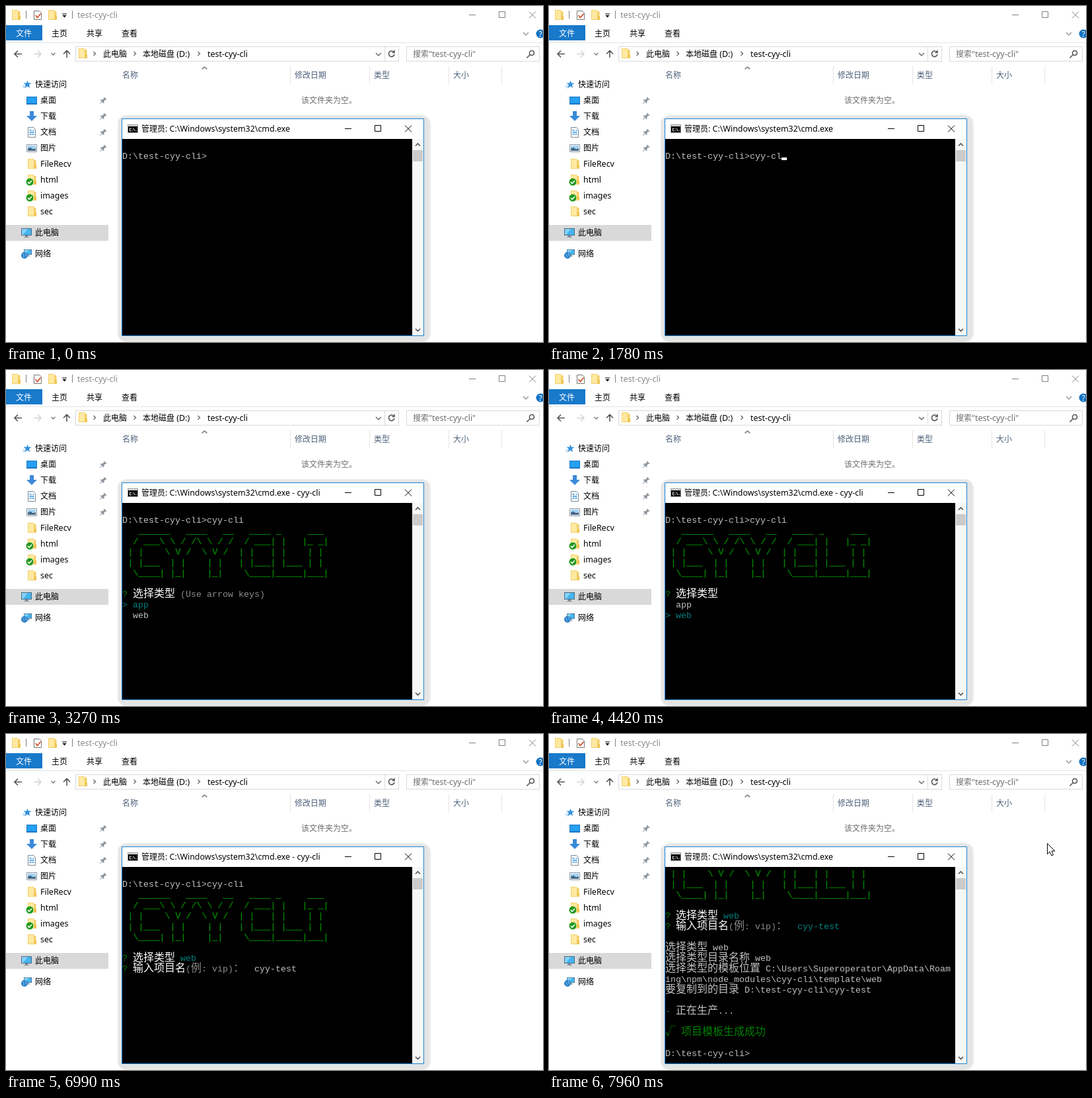
Recreate the animation shown at these times as an HTML page. Size 813 px wide and 508 px high, loop 8 s.

```html
<!DOCTYPE html>
<html lang="zh-CN">
<head>
<meta charset="utf-8">
<title>cyy-cli</title>
<style>
html, body { margin: 0; width: 100%; height: 100%; overflow: hidden; background: #fff; }
svg { display: block; }
text { font: 12px "Noto Sans", "Noto Sans CJK SC", "Noto Sans CJK", sans-serif; white-space: pre; }
.l { font-size: 12.45px; }
.head { fill: #4c607a; }
.soft { fill: #6d6d6d; }
.line { fill: none; stroke: #000; }
.pale { stroke: #808080; }
.chev { fill: none; stroke: #666; stroke-width: 1.3; }
.bold { stroke: #555; stroke-width: 1.6; }
.rule { fill: none; stroke: #e5e5e5; }
.box { fill: #fff; stroke: #d9d9d9; }
#term text { font: 13.333px "Liberation Mono", monospace; fill: #c0c0c0; }
#term .cjk { font: 300 16px "Noto Sans CJK SC", "Noto Sans CJK", sans-serif; }
#term .g { fill: #008000; }
#term .t { fill: #008080; }
#term .w { fill: #fff; }
#term .d { fill: #8c8c8c; }
#term .art { fill: #008000; stroke: #008000; stroke-width: .4; }
</style>
</head>
<body>
<svg width="813" height="508" viewBox="0 0 813 508">
  <defs>
    <g id="folder">
      <path d="M0 0h9l1 2h2.5v13H0z" fill="#f3cf69"/>
      <path d="M1 1h8v13H1z" fill="#ffe9a2"/>
      <path d="M10 9h3v6h-3z" fill="#f0c450"/>
    </g>
    <g id="pin" transform="rotate(45)" fill="#8c959e">
      <path d="M-2.5-5h5v1.3h-1v3.2l2 2v1h-7v-1l2-2v-3.2h-1zM-.5 2.5h1v4h-1z"/>
    </g>
    <g id="ok">
      <circle r="5.5" fill="#1f9a1f"/>
      <path d="M-3 0l2 2.3 4-4.3" fill="none" stroke="#fff" stroke-width="1.6"/>
    </g>
    <path id="gt" class="chev" d="M-1.5-3l3 3-3 3"/>
    <path id="down" class="chev" d="M-4-2l4 4 4-4"/>
    <g id="screen">
      <path d="M0 0h16v11H0z" fill="#4a6b85"/>
      <path d="M1 1h14v9H1z" fill="#45b4ee"/>
      <path d="M1 1h9L3 10H1z" fill="#84d2f8"/>
      <path d="M6 11h4v2H6zM4 13h8v1H4z" fill="#7b8a96"/>
    </g>
  </defs>

  <rect width="813" height="508" fill="#fff"/>

  <!-- title bar -->
  <use href="#folder" x="9" y="6"/>
  <path class="line pale" d="M30.5 7v12M100.5 7v12"/>
  <path d="M42.5 7.5h8l3 3v10h-11z" fill="#fff" stroke="#777"/>
  <path d="M44.5 14l3 3.5 5-6" fill="none" stroke="#d5532f" stroke-width="1.8"/>
  <use href="#folder" x="64" y="6"/>
  <path d="M85 11.5h7v1h-7zM85.5 14h6l-3 3.5z"/>
  <text class="l" x="108" y="18" fill="#888">test-cyy-cli</text>
  <path class="line pale" d="M701 13.5h10M746.5 8.5h9v9h-9zM792 8.5l10 10M802 8.5l-10 10"/>

  <!-- tabs -->
  <path d="M0 29h55v23H0z" fill="#1979ca"/>
  <text x="15" y="45.5" fill="#fff">文件</text>
  <text x="69" y="46">主页</text>
  <text x="122" y="46">共享</text>
  <text x="175" y="46">查看</text>
  <use href="#down" x="787" y="42" opacity=".7"/>
  <circle cx="809" cy="42" r="6.5" fill="#1173c4"/>
  <text x="806.5" y="46.5" fill="#fff" font-weight="bold">?</text>
  <path class="rule" d="M0 55.5h813"/>

  <!-- navigation -->
  <g fill="none" stroke-width="1.6">
    <path d="M24 72.5H13M18 67.5l-5 5 5 5M92 78V67.5M87 72.5l5-5 5 5" stroke="#555"/>
    <path d="M42 72.5h11M48 67.5l5 5-5 5" stroke="#d4d4d4"/>
    <path d="M68.5 71l3 3 3-3" stroke="#777" stroke-width="1.3"/>
  </g>
  <path class="box" d="M105.5 61.5h489v22h-489zM573.5 61.5v22M606.5 61.5h201v22h-201z"/>
  <use href="#folder" x="110" y="64"/>
  <use href="#gt" x="134" y="72"/>
  <text x="147" y="76.5">此电脑</text>
  <use href="#gt" x="195" y="72"/>
  <text x="207" y="76.5">本地磁盘<tspan class="l"> (D:)</tspan></text>
  <use href="#gt" x="292" y="72"/>
  <text class="l" x="305" y="76.5">test-cyy-cli</text>
  <use href="#down" x="564" y="73"/>
  <path class="chev bold" d="M587 69.5a4.3 4.3 0 1 0 1 3.5M588 67v3.5h-3.5"/>
  <text class="soft" x="616" y="77">搜索<tspan class="l">"test-cyy-cli"</tspan></text>
  <path class="chev bold" d="M793.5 73.5l-5 5M792.5 71a3.5 3.5 0 1 0 7 0 3.5 3.5 0 1 0-7 0"/>

  <!-- list -->
  <path class="rule" d="M430.5 91v27M550.5 91v27M670.5 91v27M750.5 91v27"/>
  <path class="chev" d="M296.5 95.5l4-3.5 4 3.5"/>
  <g class="head">
    <text x="176" y="108.5">名称</text>
    <text x="437" y="108.5">修改日期</text>
    <text x="557" y="108.5">类型</text>
    <text x="677" y="108.5">大小</text>
  </g>
  <text class="soft" x="447" y="146.5">该文件夹为空。</text>

  <!-- sidebar -->
  <path d="M0 331h155v24H0z" fill="#d9d9d9"/>
  <path d="M32.5 112.5l1.4 4h4.6l-3.6 2.8 1.3 4.7-3.7-2.7-4 2.7 1.400-4.700-3.500-2.800h4.700z" fill="#2f8fdd"/>
  <path d="M25 121h4M26 123.5h4" stroke="#7db9ea"/>
  <path d="M31 137h16v12H31z" fill="#1a76c4"/><path d="M32 138h14v9H32z" fill="#25a0f2"/>
  <path d="M36 159h6v7h5l-8 8-8-8h5z" fill="#3b8ad8"/>
  <path d="M33.5 183.5h8l3 3v12h-11z" fill="#fff" stroke="#7c8a96"/>
  <path d="M35.5 188h3m2 0h2m-7 3h7m-7 3h3m1 0h3" stroke="#2f8fdd" stroke-width="1.5"/>
  <path d="M31.5 209.5h15v11h-15z" fill="#fff" stroke="#8b949c"/>
  <path d="M33 211h12v4H33z" fill="#9ed3f3"/><path d="M33 219v-4l4-1 4 2 4-1v4z" fill="#45698a"/>
  <use href="#folder" x="33" y="231"/>
  <use href="#folder" x="33" y="255"/><use href="#ok" x="36" y="266"/>
  <use href="#folder" x="33" y="279"/><use href="#ok" x="36" y="290"/>
  <use href="#folder" x="33" y="303"/>
  <use href="#screen" x="23" y="336"/>
  <use href="#screen" transform="translate(27 368) scale(.75)"/>
  <circle cx="28" cy="377" r="5" fill="#2b7fc6"/>
  <path d="M25 374q3 2 2 6M29 373q2 3 2 6" fill="none" stroke="#8fcbf2"/>
  <text x="44" y="122.5">快速访问</text>
  <text x="52" y="146.5">桌面</text>
  <text x="52" y="170.5">下载</text>
  <text x="52" y="194.5">文档</text>
  <text x="52" y="218.5">图片</text>
  <text class="l" x="52" y="243">FileRecv</text>
  <text class="l" x="52" y="267">html</text>
  <text class="l" x="52" y="291">images</text>
  <text class="l" x="52" y="315">sec</text>
  <text x="44" y="347">此电脑</text>
  <text x="44" y="379">网络</text>
  <use href="#pin" x="0" y="0" transform="translate(147 143)"/>
  <use href="#pin" transform="translate(147 167)"/>
  <use href="#pin" transform="translate(147 191)"/>
  <use href="#pin" transform="translate(147 215)"/>

  <!-- console window -->
  <rect x="169" y="165" width="474" height="343" rx="13" fill="#ebebeb"/>
  <rect x="171" y="167" width="469" height="339" rx="10" fill="#e4e4e4"/>
  <path d="M175.5 170.5h457v328h-457z" fill="#fff" stroke="#1883d7"/>
  <path d="M184.5 179.5h15v12h-15z" stroke="#9a9a9a"/>
  <path d="M185 180h14v2h-14z" fill="#d8d8d8"/>
  <path d="M189.5 185h-2v4h2M191 185.5v1m0 1.5v1M193 185l2 4M196.5 188.5h1" fill="none" stroke="#fff"/>
  <text x="205" y="190">管理员<tspan class="l" id="title"></tspan></text>
  <path class="line" d="M513 185.5h10M558.5 180.5h9v9h-9zM604 180.5l10 10M614 180.5l-10 10"/>
  <path d="M176 201h439v297H176z"/>
  <path d="M615 201h17v297h-17z" fill="#f7f7f7"/>
  <path d="M616 218h15v17h-15z" fill="#cbcbcb"/>
  <path class="chev bold" d="M620 211.5l3.5-3.5 3.5 3.5M620 488l3.5 3.5 3.5-3.5"/>
  <g id="term"></g>
  <path id="mouse" d="M754.5 165.5v16l3.7-3.5 2.6 6 2.7-1.2-2.5-5.8h5z" fill="#fff" stroke="#000" display="none"/>
</svg>
<script>
const LOOP = 8000, CELL = 8, ROW = 16, LEFT = 176, TOP = 201;
const term = document.getElementById('term');
const title = document.getElementById('title');
const mouse = document.getElementById('mouse');

const ART = [
  '  ______   ____   __   ____ _     ___ ',
  ' / ___\\ \\ / /\\ \\ / /  / ___| |   |_ _|',
  '| |    \\ V /  \\ V /  | |   | |    | | ',
  '| |___  | |    | |   | |___| |___ | | ',
  ' \\____| |_|    |_|    \\____|_____|___|'
].map(s => ['art', ' ' + s]);

// A line is a flat list of style, text pairs.
const PROMPT = 'D:\\test-cyy-cli>', CMD = 'cyy-cli', NAME = 'cyy-test';
const plain = s => ['', s];
const shell = n => [[], plain(PROMPT + CMD.slice(0, n))];
const banner = [...shell(7), ...ART, []];
const busy = mark => [...shell(7), ['t', mark, '', ' 正在检查更新...']];
const ask = ['g', '? ', 'w', '选择类型 '];
const chosen = [...ask, 't', 'web'];
const nameLine = (style, s) =>
  ['g', '? ', 'w', '输入项目名', 'd', '(例: vip)：', style, '  ' + s];
const done = [
  ...banner, chosen, nameLine('t', NAME), [],
  plain('选择类型 web'),
  plain('选择类型目录名称 web'),
  plain('选择类型的模板位置 C:\\Users\\Superoperator\\AppData\\Roam'),
  plain('ing\\npm\\node_modules\\cyy-cli\\template\\web'),
  plain('要复制到的目录 D:\\test-cyy-cli\\cyy-test'), [],
  ['t', '- ', '', '正在生产...'], [],
  ['g', '√ 项目模板生成成功'], [],
  plain(PROMPT)
].slice(4);

const steps = [];
const add = (at, lines, cursor, running = true, pointer = false) =>
  steps.push({ at, lines, cursor, running, pointer });

// time, letters typed, cursor shown
[[0, 0, 0], [120, 0, 1], [650, 1, 0], [800, 2, 1], [950, 3, 1], [1230, 3, 0],
 [1350, 4, 1], [1660, 5, 1], [1780, 6, 1], [2060, 7, 1]]
  .forEach(([at, n, on]) => add(at, shell(n), on && [16 + n, 1], false));

add(2210, shell(7), [0, 2], false);
add(2330, shell(7), [0, 2]);
add(2730, shell(7));
add(2880, busy('-'));
add(3000, busy('\\'));
add(3150, banner);
add(3270, [...banner, [...ask, 'd', '(Use arrow keys)'], ['t', '> app'], plain('  web')]);
add(4420, [...banner, ask, plain('  app'), ['t', '> web']]);

[[4700, 0, 1], [4820, 0, 0], [5220, 1, 1], [5340, 2, 1], [5460, 3, 0],
 [5580, 3, 1], [5860, 3, 0], [6010, 4, 1], [6160, 5, 1], [6280, 6, 1],
 [6400, 6, 0], [6560, 7, 1], [6710, 8, 1], [6990, 8, 0]]
  .forEach(([at, n, on]) =>
    add(at, [...banner, chosen, nameLine('', NAME.slice(0, n))], on && [25 + n, 9]));

add(7270, done, [16, 17], false);
add(7960, done, null, false, true);

const escape = s => s.replace(/&/g, '&amp;').replace(/</g, '&lt;').replace(/>/g, '&gt;');

function lineMarkup(line, row) {
  // Half a pixel keeps the thin strokes of the banner crisp.
  const nudge = line[0] === 'art' ? .5 : 0;
  let col = 0, html = '';
  for (let i = 0; i < line.length; i += 2) {
    for (const run of line[i + 1].match(/[\x00-\xff]+|[^\x00-\xff]+/g) || []) {
      const wide = run.charCodeAt(0) > 255;
      html += `<tspan x="${LEFT + col * CELL + nudge}" class="${line[i]}${wide ? ' cjk' : ''}">${escape(run)}</tspan>`;
      col += run.length * (wide ? 2 : 1);
    }
  }
  return html && `<text y="${TOP + row * ROW + 14 - nudge}">${html}</text>`;
}

function show({ lines, cursor, running, pointer }) {
  let html = lines.map(lineMarkup).join('');
  if (cursor) {
    const [c, r] = cursor;
    html += `<rect x="${LEFT + c * CELL}" y="${TOP + r * ROW + 12}" width="8" height="4" fill="#fff"/>`;
  }
  term.innerHTML = html;
  title.textContent = ': C:\\Windows\\system32\\cmd.exe' + (running ? ' - cyy-cli' : '');
  mouse.setAttribute('display', pointer ? 'inline' : 'none');
}

let start, current;
function tick(now) {
  start ??= now;
  const t = (now - start) % LOOP;
  const step = steps.findLast(s => s.at <= t) || steps[0];
  if (step !== current) show(current = step);
  requestAnimationFrame(tick);
}
show(current = steps[0]);
requestAnimationFrame(tick);
</script>
</body>
</html>
```
